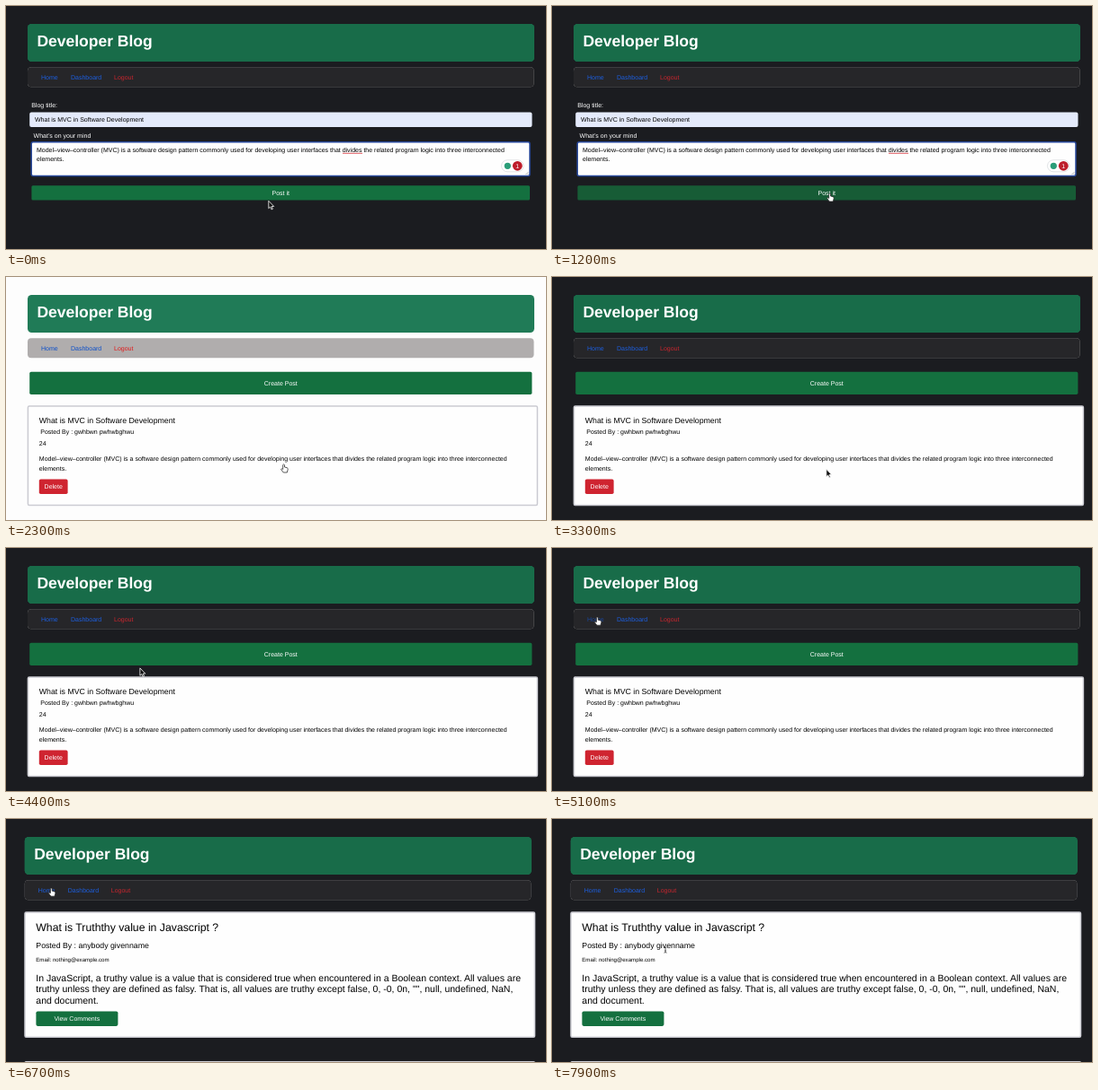
Recreate the animation shown at these times as an HTML page. Size 600x271 px, loop 8000 ms.

```html
<!DOCTYPE html>
<html lang="en">
<head>
<meta charset="utf-8">
<title>Developer Blog</title>
<style>
  html, body { margin: 0; height: 100%; overflow: hidden; background: #1b1c20; }
  svg { display: block; width: 100vw; height: 100vh; }
  text { font: 7px "Liberation Sans", Arial, sans-serif; text-rendering: geometricPrecision; }
  .dark { opacity: var(--dark); }
  .white { fill: #fff; }
  .mid { text-anchor: middle; }
  .brand { font-size: 17.5px; font-weight: bold; }
  .h5 { font-size: 8.75px; }
  .h4 { font-size: 10.5px; }
  .h3 { font-size: 12.25px; }
  .small { font-size: 6.125px; }
  .link { fill: #1d5fe0; }
  .logout { fill: #c8262e; }
  .light .link { fill: #0c4fc9; }
  .light .logout { fill: #e01b1b; }
  .link.hover { fill: #1b479c; }
  .button { fill: #14703f; }
  .button.hover { fill: #175c36; }
  .card { fill: #fefefe; stroke: #cbcbd2; stroke-width: 1.5; }
  #cursor path { stroke-linejoin: round; }
</style>
</head>
<body>
<svg id="stage" viewBox="0 0 600 271" preserveAspectRatio="none">
  <rect width="600" height="271" fill="#fdfdfd"/>
  <rect class="dark" width="600" height="271" fill="#1b1c20"/>

  <g id="site">
    <rect x="24" y="20" width="563" height="42" rx="4.5" fill="#207b57"/>
    <rect class="dark" x="24" y="20" width="563" height="42" rx="4.5" fill="#186c49"/>
    <rect x="24" y="68.3" width="562.5" height="22" rx="4" fill="#b0adad"/>
    <rect class="dark" x="24" y="68.3" width="562.5" height="22" rx="4" fill="#262629"/>
    <text class="brand white" x="34.4" y="45.3">Developer Blog</text>
    <text id="home" class="link" x="39" y="81.8">Home</text>
    <text class="link" x="72" y="81.8">Dashboard</text>
    <text class="logout" x="120" y="81.8">Logout</text>
  </g>

  <g id="compose">
    <text class="white" x="28.2" y="113.3">Blog title:</text>
    <rect x="26.2" y="118.5" width="558.3" height="16.5" rx="2" fill="#e4eafb"/>
    <text x="32" y="129.2">What is MVC in Software Development</text>
    <text class="white" x="30.6" y="147">What’s on your mind</text>
    <rect x="28.2" y="151.8" width="553.8" height="37.7" rx="2" fill="#fefefe" stroke="#27479a" stroke-width="1.5"/>
    <text x="34" y="162.6">Model–view–controller (MVC) is a software design pattern commonly used for developing user interfaces that divides the related program logic into three interconnected</text>
    <text x="34" y="173.1">elements.</text>
    <path d="M374 164.3H396" stroke="#dc4a50" stroke-width=".9"/>
    <path d="M577.5 188l3-3M579.5 188l1-1" stroke="#777" stroke-width=".5"/>
    <rect x="550.5" y="171.8" width="24.5" height="13" rx="6.5" fill="#fff" stroke="#d5d7dc" stroke-width=".7"/>
    <circle cx="557.3" cy="178.3" r="3.6" fill="#2a9d78"/>
    <circle cx="568.3" cy="178.3" r="5.4" fill="#bd1d2b"/>
    <text class="white mid" x="568.3" y="180.8" font-weight="bold">1</text>
    <rect id="post" class="button" x="28.4" y="200.2" width="553.6" height="16.4" rx="1.5"/>
    <text class="white mid" x="305.3" y="211">Post it</text>
  </g>

  <g id="dashboard">
    <rect id="create" class="button" x="26.2" y="105.8" width="558.2" height="25.2" rx="1.8"/>
    <text class="white mid" x="305.3" y="120.8">Create Post</text>
    <rect class="card" x="24.4" y="144" width="566" height="110.5" rx="1.5"/>
    <text class="h5" x="36.8" y="162.6">What is MVC in Software Development</text>
    <text x="38.3" y="174.6">Posted By : gwhbwn pwhwbghwu</text>
    <text x="36.8" y="187.6">24</text>
    <text x="36.8" y="205.1">Model–view–controller (MVC) is a software design pattern commonly used for developing user interfaces that divides the related program logic into three interconnected</text>
    <text x="36.8" y="215.6">elements.</text>
    <rect x="36.8" y="225.6" width="31.8" height="16.4" rx="1.8" fill="#cf2430"/>
    <text class="white mid" x="52.7" y="236.4">Delete</text>
  </g>

  <g id="feed">
    <rect class="card" x="21" y="104" width="566.5" height="139.3" rx="1.5"/>
    <text class="h3" x="33.3" y="125.3">What is Truththy value in Javascript ?</text>
    <text class="h5" x="33.3" y="143.7">Posted By : anybody givenname</text>
    <text class="small" x="33.3" y="158.7">Email: nothing@example.com</text>
    <text class="h4" x="33.3" y="180.8">In JavaScript, a truthy value is a value that is considered true when encountered in a Boolean context. All values are</text>
    <text class="h4" x="33.3" y="193.4">truthy unless they are defined as falsy. That is, all values are truthy except false, 0, -0, 0n, "", null, undefined, NaN,</text>
    <text class="h4" x="33.3" y="206">and document.</text>
    <rect class="button" x="33.4" y="214.5" width="91" height="16.4" rx="1.8"/>
    <text class="white mid" x="78.8" y="225.4">View Comments</text>
    <rect class="card" x="21" y="270.8" width="566.5" height="20" rx="1.5"/>
  </g>

  <g id="cursor">
    <path id="arrow" d="M0 0V8.4L1.9 6.7 3.2 9.6 4.6 9 3.3 6.2H5.9Z" fill="#111" stroke="#fff" stroke-width=".8"/>
    <path id="hand" d="M-.9 .8Q0-.6 .9 .8V3.2L3.6 3.9Q4.8 4.3 4.6 5.8L3.7 9.2H-.4L-3 5.7Q-2.8 4.3-.9 5.6Z" fill="#fff" stroke="#222" stroke-width=".75"/>
    <path id="beam" d="M-1.5-3Q0-3 0-2Q0-3 1.5-3M0-2V2.2M-1.5 3.2Q0 3.2 0 2.2Q0 3.2 1.5 3.2M-.8 .9H.8" fill="none" stroke="#222" stroke-width=".7"/>
  </g>
</svg>
<script>
const LOOP = 8000, STEP = 100;
const $ = id => document.getElementById(id);
const clamp = v => Math.min(1, Math.max(0, v));
const smooth = v => v * v * (3 - 2 * v);
const show = (id, on) => $(id).style.display = on ? '' : 'none';
const hover = (id, on) => $(id).classList.toggle('hover', on);

// Pointer keys: time, x, y
const path = [
  [500, 291.8, 217.3], [1200, 308.6, 208.8], [3200, 308.6, 208.8], [3300, 304.8, 214.3],
  [3800, 304.8, 214.3], [4600, 120, 119], [5100, 50.3, 77], [7300, 50.3, 77], [7900, 126, 146]
];

function pointerAt(t) {
  const i = path.findIndex(key => key[0] > t);
  if (i === 0) return path[0].slice(1);
  if (i < 0) return path.at(-1).slice(1);
  const [t0, x0, y0] = path[i - 1], [t1, x1, y1] = path[i];
  const p = smooth((t - t0) / (t1 - t0));
  return [x0 + (x1 - x0) * p, y0 + (y1 - y0) * p];
}

// Pages open light and then fade to the dark theme
function darkness(t) {
  if (t >= 6200) return smooth(clamp((t - 6400) / 300));
  if (t >= 2300) return smooth(clamp((t - 2400) / 300));
  return 1;
}

function draw() {
  const t = Math.floor(performance.now() % LOOP / STEP) * STEP;
  const page = t < 2300 ? 'compose' : t < 6200 ? 'dashboard' : 'feed';
  for (const id of ['compose', 'dashboard', 'feed']) show(id, id === page);
  $('site').setAttribute('transform', `translate(${page === 'feed' ? -3.2 : 0} 0)`);

  const dark = darkness(t);
  $('stage').style.setProperty('--dark', dark);
  $('stage').classList.toggle('light', dark < 0.5);

  const [x, y] = pointerAt(t);
  const onPost = page === 'compose' && y < 216.6;
  const onCreate = page === 'dashboard' && y > 105.8 && y < 131;
  const onHome = x < 58 && y < 84;
  hover('post', onPost);
  hover('create', onCreate);
  hover('home', onHome && page === 'dashboard');

  const stale = t >= 2300 && t < 3300;
  const kind = onPost || onCreate || onHome || stale ? 'hand'
    : page === 'feed' && y > 136 ? 'beam' : 'arrow';
  for (const id of ['arrow', 'hand', 'beam']) show(id, id === kind);
  $('cursor').setAttribute('transform', `translate(${x} ${y})`);
  requestAnimationFrame(draw);
}
draw();
</script>
</body>
</html>
```
